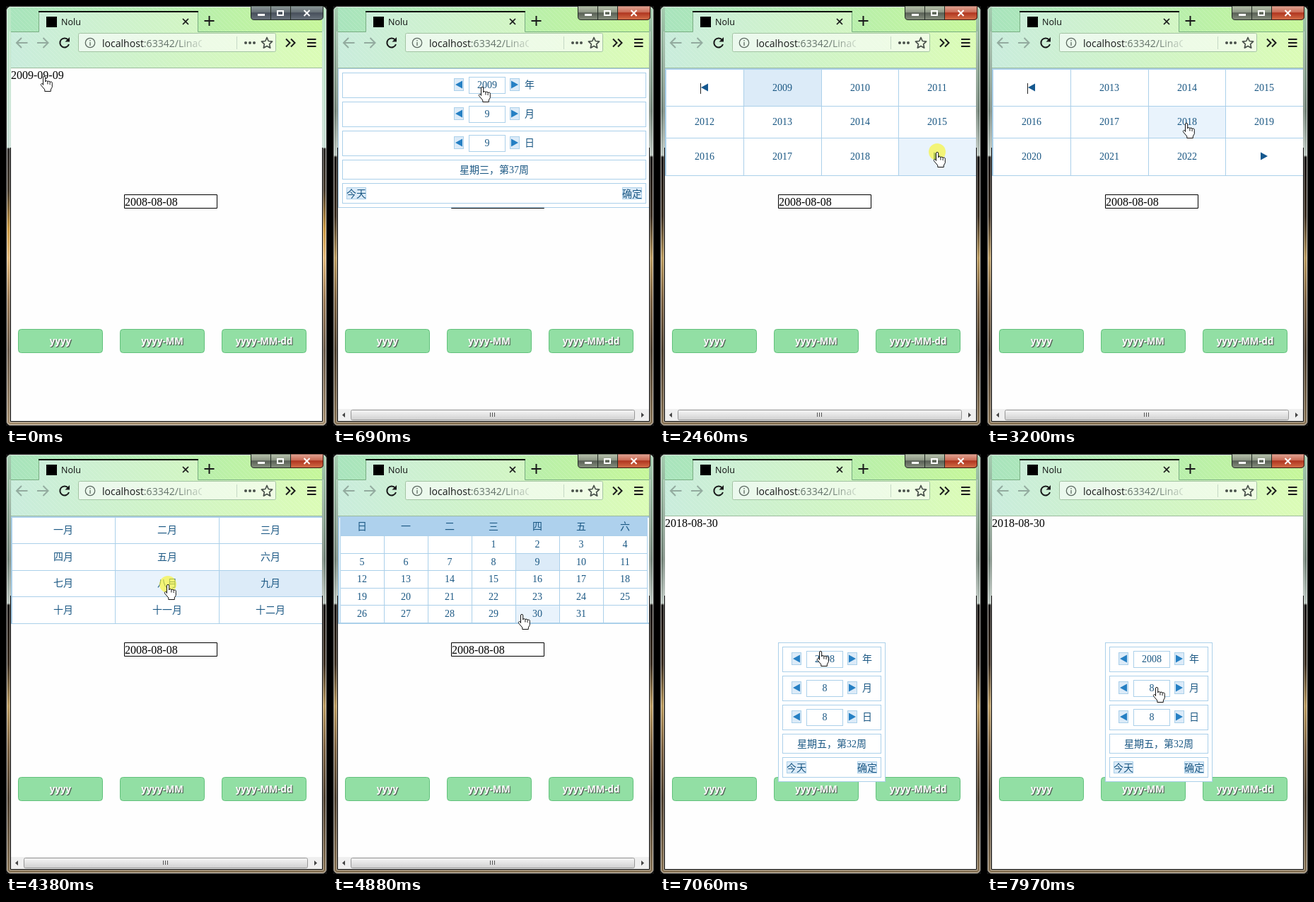
Animation, 454 px wide and 593 px high, one loop 8000 ms. Source, as an HTML page:

```html
<!DOCTYPE html>
<html lang="zh">
<head>
<meta charset="utf-8">
<title>Nolu</title>
<style>
html, body { margin: 0; width: 100%; height: 100%; overflow: hidden; background: #111; }
svg { display: block; }
text { white-space: pre; }
.ui { font-family: "Open Sans", "Noto Sans", sans-serif; }
.doc { font: 16px "Liberation Serif", serif; }
.cal { font: 14px "Liberation Serif", "Noto Sans CJK SC", "Noto Sans CJK", sans-serif; fill: #1b5884; text-anchor: middle; }
.btn { font: bold 13.3px "Open Sans", "Noto Sans", sans-serif; fill: #fff; text-anchor: middle; text-shadow: 1px 1px 1px #444; }
#glow { fill: #f8f532; opacity: .66; }
</style>
</head>
<body>
<svg id="stage" width="454" height="593" viewBox="0 0 454 593">
  <defs>
    <linearGradient id="bar"><stop stop-color="#a9e4bd"/><stop offset=".5" stop-color="#b5edaf"/><stop offset="1" stop-color="#c6f79a"/></linearGradient>
    <linearGradient id="nav"><stop stop-color="#c9ecdc"/><stop offset=".5" stop-color="#d0f4c6"/><stop offset="1" stop-color="#dbfcb6"/></linearGradient>
    <linearGradient id="edgeA" x2="0" y2="1">
      <stop stop-color="#b9e8c4"/><stop offset=".336" stop-color="#c6dcd2"/><stop offset=".34" stop-color="#2b2927"/>
      <stop offset=".44" stop-color="#453a2c"/><stop offset=".53" stop-color="#c9973f"/><stop offset=".6" stop-color="#e3b878"/>
      <stop offset=".7" stop-color="#9b7a55"/><stop offset=".82" stop-color="#6a5a4a"/><stop offset="1" stop-color="#a58f70"/>
    </linearGradient>
    <linearGradient id="edgeB" x2="0" y2="1">
      <stop stop-color="#a5cdb0"/><stop offset=".25" stop-color="#6f7f74"/><stop offset=".355" stop-color="#b9c4bd"/><stop offset=".36" stop-color="#17130f"/>
      <stop offset=".5" stop-color="#3a2d20"/><stop offset=".6" stop-color="#b8985c"/><stop offset=".7" stop-color="#7a6040"/>
      <stop offset=".82" stop-color="#4b3d2d"/><stop offset="1" stop-color="#8a7658"/>
    </linearGradient>
    <linearGradient id="slate" x2="0" y2="1"><stop stop-color="#8f9c9c"/><stop offset=".45" stop-color="#667076"/><stop offset=".5" stop-color="#474f5b"/><stop offset="1" stop-color="#69727c"/></linearGradient>
    <linearGradient id="glass" x2="0" y2="1"><stop stop-color="#b9c4ae"/><stop offset=".45" stop-color="#8d9785"/><stop offset=".5" stop-color="#596056"/><stop offset="1" stop-color="#87907f"/></linearGradient>
    <linearGradient id="red" x2="0" y2="1"><stop stop-color="#e2a797"/><stop offset=".45" stop-color="#cb6c56"/><stop offset=".5" stop-color="#b0351f"/><stop offset="1" stop-color="#d4704a"/></linearGradient>
    <linearGradient id="thumb" x2="0" y2="1"><stop stop-color="#f6f6f6"/><stop offset=".5" stop-color="#e3e3e3"/><stop offset="1" stop-color="#cfcfcf"/></linearGradient>
    <linearGradient id="fade" gradientUnits="userSpaceOnUse" x1="240" x2="280"><stop stop-color="#64736a"/><stop offset="1" stop-color="#64736a" stop-opacity=".15"/></linearGradient>
    <pattern id="hatch" width="6" height="6" patternUnits="userSpaceOnUse"><path d="M0 0L6 6M-1 5L1 7M5-1L7 1" stroke="#fff" stroke-opacity=".15"/></pattern>
    <clipPath id="page"><path d="M7 88H447V586H7z"/></clipPath>
    <clipPath id="url"><path d="M102 38H277V66H102z"/></clipPath>
  </defs>

  <rect id="edge" x=".5" y=".5" width="453" height="592" rx="6" stroke="#222"/>
  <rect x="1.5" y="1.5" width="451" height="590" rx="5" fill="none" stroke="#fff" stroke-opacity=".6"/>
  <path d="M5.500 36V587.500H448.500V36" fill="none" stroke="#fff" stroke-opacity=".45"/>

  <path d="M7 2H447V36H7z" fill="url(#bar)"/>
  <path d="M7 36H447V88H7zM47 8H271V36H47z" fill="url(#nav)"/>
  <path d="M7 2H447V88H7z" fill="url(#hatch)"/>
  <path d="M7 36.5H46.5V8M271.5 8V36.5H447" fill="none" stroke="#79ad82"/>
  <path d="M46 8H272" stroke="#0c0c0d" stroke-width="2"/>
  <path d="M7 87.5H447" stroke="#9dbb9d"/>
  <path d="M57 15h15v15H57z"/>
  <text class="ui" x="78" y="27" font-size="12.5" fill="#0c0c0d">Nolu</text>

  <path id="caption" d="M346.500 0V15Q346.500 19.500 351 19.500H443Q448.500 19.500 448.500 15V0z" stroke="#222c24"/>
  <path id="close" d="M402.500 0V19.500H443Q448.500 19.500 448.500 15V0z" fill="url(#red)" stroke="#3a1a14"/>
  <path d="M374.500 0V19M402.500 0V19" stroke="#222c24"/>
  <g fill="none" stroke="#fff" stroke-width="2"><path d="M356 12.500h10" stroke-width="3"/><path d="M384 7h8v6h-8z"/><path d="M421.500 6l8 8m0-8l-8 8"/></g>

  <g fill="none" stroke="#18191a" stroke-width="2">
    <path d="M250 18l8 8m0-8l-8 8" stroke-width="1.700"/>
    <path d="M280.500 21h14M287.500 14v14"/>
    <path d="M30.500 52H15m7-7l-7 7l7 7M44 52h15.500m-7-7l7 7l-7 7" stroke="#93ab9f"/>
    <path d="M88 48A6.500 6.500 0 1 0 89 54"/><path d="M90 44v6.500h-6.500z" fill="#18191a" stroke="none"/>
    <path d="M396 46.500l5.500 5.500l-5.500 5.500M403 46.500l5.500 5.500l-5.500 5.500"/>
    <path d="M426 47h12.500M426 52h12.500M426 57h12.500"/>
  </g>
  <rect x="102.500" y="38.500" width="279" height="26" rx="2" fill="#fff" fill-opacity=".6" stroke="#a3c3a3"/>
  <g fill="none" stroke="#5d6a62" stroke-width="1.300"><circle cx="119" cy="52" r="6.700"/><path d="M119 51v5M119 48v1.600"/></g>
  <path d="M326.500 43v18" stroke="#c5d8c5"/>
  <g fill="#4a524c"><circle cx="339" cy="52" r="2"/><circle cx="345" cy="52" r="2"/><circle cx="351" cy="52" r="2"/></g>
  <path d="M369 44.500l2.200 5l5.400.6l-4 3.700l1.100 5.400l-4.700-2.700l-4.700 2.700l1.100-5.400l-4-3.700l5.400-.6z" fill="none" stroke="#4a524c" stroke-width="1.700" stroke-linejoin="round"/>
  <text class="ui" clip-path="url(#url)" x="136" y="57.500" font-size="14.050" fill="#18191a">localhost<tspan fill="url(#fade)">:63342/LinaC</tspan></text>

  <path d="M7 88H447V586H7z" fill="#fefefe"/>
  <path d="M6.500 200V586.500H447.500V200" fill="none" stroke="#000"/>
  <g clip-path="url(#page)">
    <text class="doc" id="date" x="7" y="103"></text>
    <path d="M167.500 266.500h131v19h-131z" fill="#fff" stroke="#000"/>
    <text class="doc" x="168" y="282">2008-08-08</text>
    <g id="buttons"></g>
    <g id="scroll">
      <path d="M7 569H447V586H7z" fill="#efefef"/>
      <rect x="25.500" y="570.500" width="401" height="14" rx="2" fill="url(#thumb)" stroke="#979797"/>
      <path d="M222.500 574v6M225.500 574v6M228.500 574v6" stroke="#555"/>
      <path d="M17 574v7l-4-3.500zM436 574v7l4-3.500z" fill="#444"/>
    </g>
    <g id="view"></g>
  </g>
  <circle id="glow" r="12"/>
  <g id="pointer" fill="#fff" stroke="#111" stroke-linejoin="round">
    <path id="hand" d="M-1.500 12.500V2a1.600 1.600 0 0 1 3.200 0V8a1.600 1.600 0 0 1 3.200.3a1.600 1.600 0 0 1 3.200.8a1.600 1.600 0 0 1 3.200 1.200V15.500l-2 3.500v2.500H.8V19L-4.300 13c-1.200-2 .9-3.300 2.200-1.900zM4.900 8.500v3M8.100 9.500v2.500"/>
    <path id="arrow" d="M.5.500V16.500L4.200 13L6.700 18.800L9.200 17.700L6.800 12H11.700z"/>
  </g>
</svg>
<script>
const LOOP = 8000;
const $ = id => document.getElementById(id);
const LINE = '#abd0ea', PALE = '#e9f3fc', PICKED = '#dcebf8', HEAD = '#aed1ed';

const box = (x, y, w, h, fill = '#fff', stroke = LINE) =>
  `<rect x="${x + .5}" y="${y + .5}" width="${w - 1}" height="${h - 1}" fill="${fill}" stroke="${stroke}"/>`;
const label = (x, y, s) => `<text class="cal" x="${x}" y="${y}">${s}</text>`;
const tri = (x, y, dir, fill) => `<path d="M${x - 5 * dir} ${y - 5.5}v11l${10 * dir} -5.5z" fill="${fill}"/>`;

// Picker panel: three spinner rows, the weekday line and the two buttons
function panel(x, y, w, [year, month, day, week]) {
  const c = x + w / 2;
  let out = box(x, y, w, 197);
  [[year, '年'], [month, '月'], [day, '日']].forEach(([n, unit], i) => {
    const top = y + 6 + 41 * i;
    out += box(x + 6, top, w - 12, 36) + box(c - 36, top + 6, 52, 24);
    [[-50, -1], [29, 1]].forEach(([dx, dir]) => {
      out += box(c + dx - 7, top + 8, 14, 18, PICKED) + tri(c + dx, top + 17, dir, '#2680c4');
    });
    out += label(c - 10, top + 22, n) + label(c + 50, top + 22, unit);
  });
  out += box(x + 6, y + 129, w - 12, 28) + label(c, y + 148, week) + box(x + 6, y + 162, w - 12, 29);
  [[x + 26, '今天'], [x + w - 26, '确定']].forEach(([bx, s]) => {
    out += box(bx - 14, y + 168, 28, 17, PICKED) + label(bx, y + 182, s);
  });
  return out;
}

// Table of cells; xs and ys are the line positions
function grid({ xs, ys, cells, picked, head = 0 }, over) {
  const cols = xs.length - 1;
  let out = box(7, 88, 442, 152) + box(8, 89, 440, 150);
  cells.forEach((s, i) => {
    const c = i % cols, r = Math.floor(i / cols);
    const x = xs[c], y = ys[r], w = xs[c + 1] - x, h = ys[r + 1] - y;
    const fill = i < head ? HEAD : i === over ? PALE : s === picked ? PICKED : '#fff';
    out += box(x, y, w + 1, h + 1, fill, i < head ? HEAD : LINE);
    const mx = Math.round(x + w / 2), my = Math.floor(y + h / 2);
    out += s === '<' ? tri(mx, my, -1, '#15588f') : s === '>' ? tri(mx, my, 1, '#15588f') : label(mx, my + 5, s);
  });
  return out;
}

function cellAt({ xs, ys, head = 0 }, x, y) {
  const c = xs.findIndex((v, i) => x >= v && x < xs[i + 1]);
  const r = ys.findIndex((v, i) => y >= v && y < ys[i + 1]);
  const i = r * (xs.length - 1) + c;
  return c < 0 || r < 0 || i < head ? -1 : i;
}

const lines = (start, size, n) => Array.from({ length: n + 1 }, (_, i) => Math.floor(start + size * i));
const years = from => ({
  xs: lines(8.4, 109.85, 4), ys: [89, 141, 186, 239], picked: '2009',
  cells: ['<', ...Array.from({ length: 10 }, (_, i) => String(from + i)), '>']
});
const months = {
  xs: lines(8, 146.5, 3), ys: lines(89, 37.5, 4), picked: '九月',
  cells: [...'一二三四五六七八九十', '十一', '十二'].map(s => s + '月')
};
const first = new Date(2018, 7, 1).getDay();
const days = {
  xs: lines(10, 62.1, 7), ys: [89, ...lines(115.5, 24.6, 5)], picked: '9', head: 7,
  cells: [...'日一二三四五六', ...Array.from({ length: 35 }, (_, i) => {
    const d = i - first + 1;
    return d > 0 && d < 32 ? String(d) : '';
  })]
};
const wide = (...date) => panel(7, 88, 442, date);

// start, content, time from which cells react to the pointer
const views = [
  [0, ''],
  [300, wide(2009, 9, 9, '星期三，第37周')],
  [1320, years(2005), 1630],
  [2450, years(2009), 0],
  [2750, years(2013), 0],
  [3360, wide(2018, 9, 9, '星期日，第36周')],
  [4000, months, 4150],
  [4460, wide(2018, 8, 9, '星期四，第32周')],
  [4880, days, 0],
  [5190, wide(2018, 8, 30, '星期四，第35周')],
  [6100, ''],
  [6890, panel(167, 266, 152, [2008, 8, 8, '星期五，第32周'])]
];

// first step, last step, number of steps, where the pointer ends
const home = [54, 99];
const moves = [
  [630, 690, 2, 211, 114], [860, 860, 1, 212, 114],
  [1630, 1710, 2, 270, 146], [1780, 2080, 5, 392, 206],
  [2820, 2970, 3, 280, 166], [3200, 3200, 1, 282, 165],
  [3690, 3850, 3, 222, 151], [4150, 4230, 2, 229, 184],
  [4540, 4620, 2, 230, 191], [4880, 4880, 1, 267, 226], [4960, 4960, 1, 277, 226],
  [5570, 5880, 5, 415, 265], [6190, 6410, 4, 227, 278], [7430, 7970, 8, 240, 329]
];
const clicks = [[220, 300], [1170, 1320], [2390, 2520], [2670, 2820], [3290, 3360], [3920, 4000],
  [4380, 4460], [4710, 4880], [5040, 5190], [6030, 6100], [6810, 6970]];
const arrows = [[400, 690], [3440, 3770], [5190, 5800], [6100, 6340]];

const within = (spans, t) => spans.some(([a, b]) => t >= a && t < b);
const show = (id, on) => $(id).setAttribute('display', on ? 'inline' : 'none');

function pointer(t) {
  let [x, y] = home;
  for (const [a, b, n, tx, ty] of moves) {
    if (t < a) break;
    const k = Math.min(n, 1 + Math.floor((t - a) * (n - 1) / (b - a || 1))) / n;
    const e = k * k * (3 - 2 * k);
    x += (tx - x) * e;
    y += (ty - y) * e;
  }
  return [Math.round(x), Math.round(y)];
}

let drawn = '';
function render(t) {
  const [x, y] = pointer(t);
  const n = views.filter(v => t >= v[0]).length - 1;
  const [, content, live] = views[n];
  const table = typeof content === 'object';
  const over = table && t >= live ? cellAt(content, x, y) : -1;
  const key = n + ':' + over;
  if (key !== drawn) {
    drawn = key;
    const caret = n === 3 || n === 4 ? '<path d="M57.5 109v15" stroke="#222"/>' : '';
    $('view').innerHTML = (table ? grid(content, over) : content) + caret;
    $('date').textContent = n < 9 ? '2009-09-09' : '2018-08-30';
    show('scroll', n > 0 && n < 10);
  }
  const focused = t >= 220;
  $('edge').setAttribute('fill', focused ? 'url(#edgeB)' : 'url(#edgeA)');
  $('caption').setAttribute('fill', focused ? 'url(#glass)' : 'url(#slate)');
  show('close', focused);
  const at = `translate(${x} ${y})`;
  $('pointer').setAttribute('transform', at);
  $('glow').setAttribute('transform', at);
  show('glow', within(clicks, t));
  const plain = within(arrows, t);
  show('arrow', plain);
  show('hand', !plain);
}

$('buttons').innerHTML = ['yyyy', 'yyyy-MM', 'yyyy-MM-dd'].map((s, i) => {
  const x = 17 + 144 * i;
  return `<rect x="${x + .5}" y="456.5" width="119" height="33" rx="4" fill="#92dfa4" stroke="#62c17c"/>` +
    `<text class="btn" x="${x + 60}" y="478">${s}</text>`;
}).join('');

const began = performance.now();
function tick() {
  render((performance.now() - began) % LOOP);
  requestAnimationFrame(tick);
}
tick();
</script>
</body>
</html>
```
